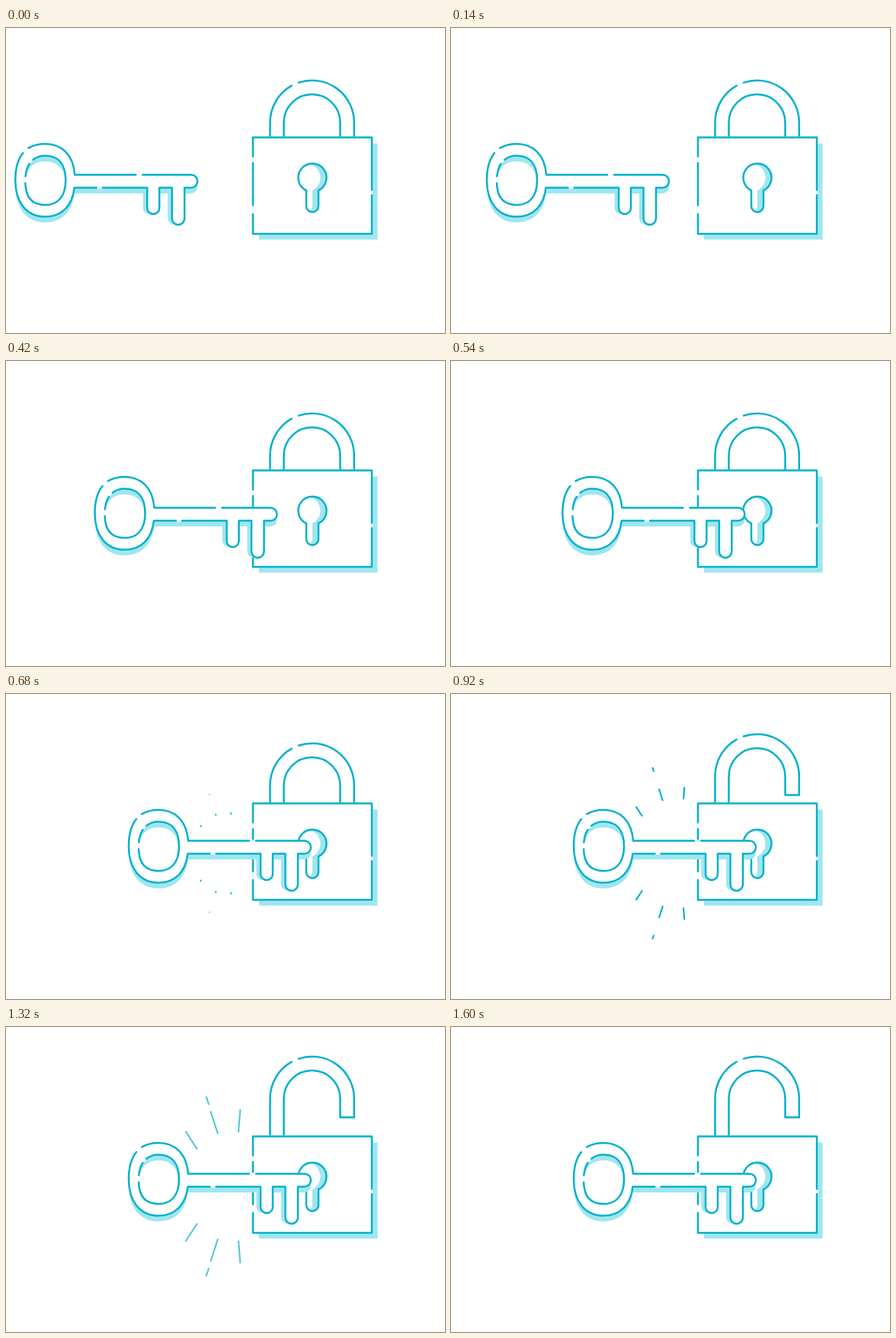
An HTML page for the animation above (6 s loop, 576 by 400 pixels).

```html
<!DOCTYPE html>
<html lang="en">
<head>
<meta charset="utf-8">
<title>Key and padlock</title>
<style>
  html, body { margin: 0; height: 100%; overflow: hidden; background: #fff; }
  svg { display: block; width: 576px; height: 400px; }
  .line { fill: none; stroke: #00b1cb; stroke-width: 2.5; stroke-linecap: round; stroke-linejoin: round; }
  .body { fill: #fff; stroke: #fff; stroke-width: 2.5; fill-rule: evenodd; }
  .shade { fill: #9fe6ee; fill-rule: evenodd; }
  #sparks { fill: none; stroke: #00b1cb; stroke-width: 2.1; }
</style>
</head>
<body>
<svg viewBox="0 0 576 400">
  <defs>
    <path id="stem" d="M89.5 209.5C87 233 73 247.5 51 247.5C27 247.5 12 229 12 199.7C12 170 27 152 51 152
      C73 152 88 166 90 192.5H242.5a8.5 8.5 0 0 1 0 17Z
      M51 167.5C67 167.5 78 177 78 199.7C78 222 67 232 51 232C35 232 25 222 25 199.7C25 177 35 167.5 51 167.5Z"/>
    <path id="teeth" d="M185 209V236a8 8 0 0 0 16 0V209ZM217.5 209V249.7a8.25 8.25 0 0 0 16.5 0V209Z"/>
    <path id="hole" d="M394 213A18.5 18.5 0 1 1 410 213V233.5A8 8 0 0 1 394 233.5Z"/>
    <clipPath id="inHole"><use href="#hole"/></clipPath>
  </defs>

  <g id="shackle" class="line">
    <path d="M346.5 190V124A55.2 55.2 0 0 1 374.8 75.7M384 71.6A55.2 55.2 0 0 1 456.8 124V148.5H438.5V124A37 37 0 0 0 364.5 124V190"/>
  </g>

  <path class="shade" d="M332 151.5H487.5V277.5H332Z"/>
  <path class="body" d="M324 143.5H480V270H324Z"/>
  <path class="line" d="M324 168.5V143.5H480V212.5M480 219V270H324V244M324 232.5V177"/>
  <g clip-path="url(#inHole)">
    <use href="#hole" class="shade"/>
    <use href="#hole" x="-8" fill="#fff"/>
  </g>
  <use href="#hole" class="line"/>

  <g id="key">
    <use href="#stem" class="shade" y="7.5"/>
    <use href="#teeth" class="shade" x="-5.5"/>
    <use href="#stem" class="body"/>
    <use href="#teeth" class="body"/>
    <path class="line" d="M179 192.5H242.5a8.5 8.5 0 0 1 0 17H234V249.7a8.25 8.25 0 0 1 -16.5 0V209.5H201V236a8 8 0 0 1 -16 0V209.5H126.5
      M118.5 209.5H89.5C87 233 73 247.5 51 247.5C27 247.5 12 229 12 199.7C12 185 15.5 172 22 164
      M29.2 157.4C35 154 42.5 152 51 152C73 152 88 166 90 192.5H170
      M25.1 203.5C25.6 223 35 232 51 232C67 232 78 222 78 199.7C78 177 67 167.5 51 167.5C45 167.5 39.5 169.3 35.3 172.8
      M30.5 178C27.5 182.5 26 188 25.3 194.5"/>
  </g>

  <path id="sparks"/>
</svg>
<script>
const LOOP = 6000, AXIS = 209, CENTER = 270;
// inner end x, y and full reach dx, dy of each ray above the key
const rays = [
  [251, 160.5, -15.6, -24],
  [278, 140.3, -9.6, -30],
  [305, 138, 2.4, -30],
  [266.2, 102, -3.6, -10.8]
];
const [key, shackle, sparks] = ['key', 'shackle', 'sparks'].map(id => document.getElementById(id));
const ramp = (t, start, length) => Math.min(1, Math.max(0, (t - start) / length));

function sparkPath(grow) {
  return rays.flatMap(([x, y, dx, dy]) => [1, -1].map(side =>
    `M${x} ${AXIS + side * (y - AXIS)}l${dx * grow} ${side * dy * grow}`)).join('');
}

function draw(t) {
  key.setAttribute('transform', `translate(${149 * ramp(t, 0, 600)} 0)`);
  shackle.setAttribute('transform', `translate(0 ${-30 * ramp(t, 600, 600)})`);

  const scale = 1 - (1 - ramp(t, 600, 300)) ** 4;
  sparks.setAttribute('d', sparkPath(ramp(t, 600, 600)));
  sparks.setAttribute('transform',
    `translate(${CENTER} ${AXIS}) scale(${scale}) translate(${-CENTER} ${-AXIS})`);
  sparks.setAttribute('opacity', t > 600 ? 1 - ramp(t, 1200, 400) : 0);
}

const begin = performance.now();
function tick() {
  draw((performance.now() - begin) % LOOP);
  requestAnimationFrame(tick);
}
draw(0);
requestAnimationFrame(tick);
</script>
</body>
</html>
```
